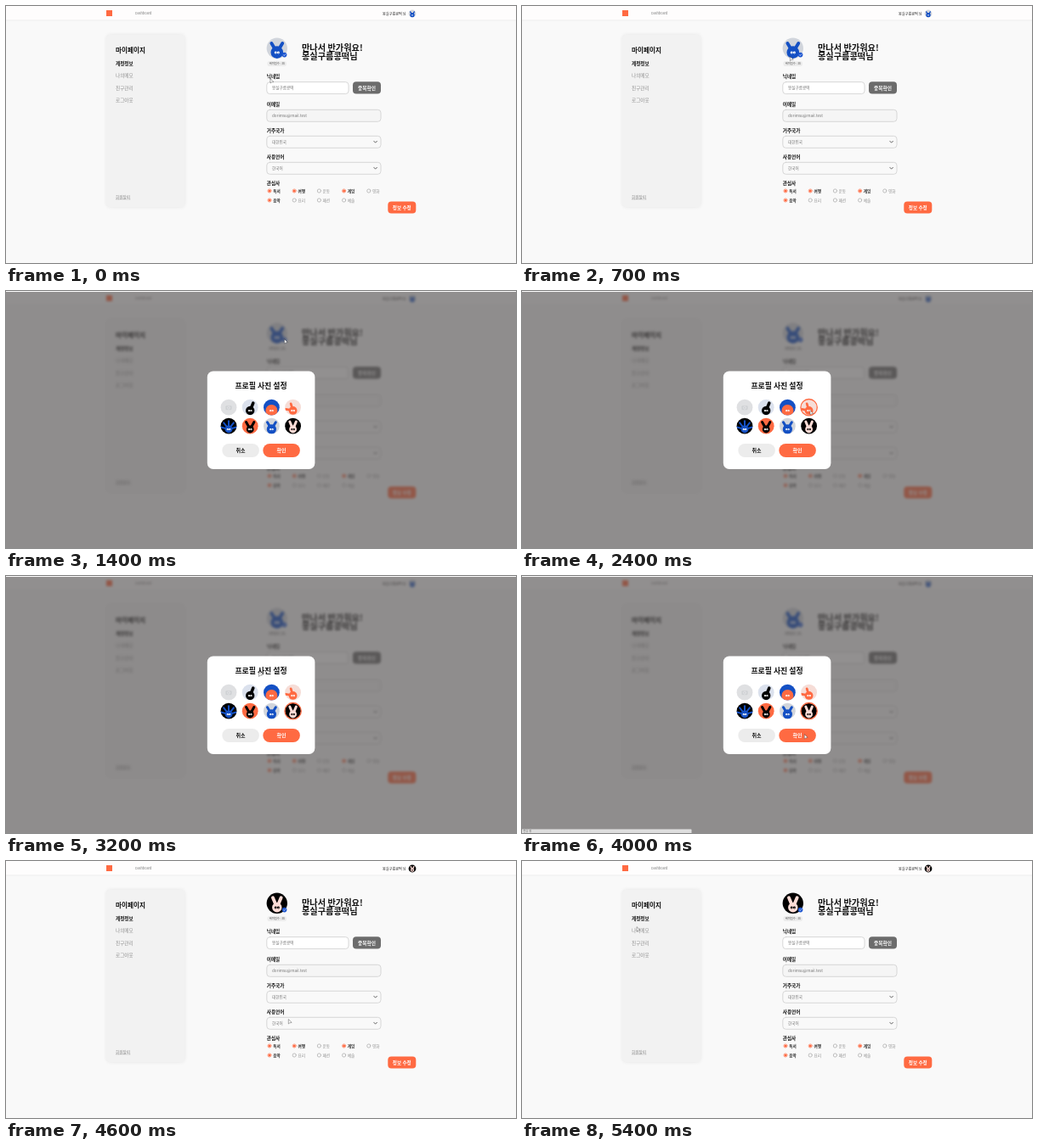
An HTML page with a canvas that plays this animation: 600x303 px, repeating every 5500 ms.

```html
<!DOCTYPE html>
<html lang="ko">
<head>
<meta charset="utf-8">
<title>마이페이지</title>
<style>
html, body { margin: 0; width: 100%; height: 100%; overflow: hidden; background: #f9f9f9; }
canvas { display: block; width: 600px; height: 303px; }
</style>
</head>
<body>
<canvas id="stage"></canvas>
<script>
const W = 600, H = 303, LOOP = 5500, STEP = 100;
const OPEN = 1400, PICK_A = 2400, PICK_B = 3100, SEND = 3900, LOAD = 4100, DONE = 4300, IDLE = 4500;
const FONT = '"Noto Sans CJK KR", "Noto Sans KR", "Noto Sans", sans-serif';
const BG = '#f9f9f9', INK = '#111', MUTED = '#8d8d8d', ORANGE = '#ff6a42', BLUE = '#1450c4', BLACK = '#000';
const NICK = '몽실구름콩떡', MAIL = 'dorimsu@mail.test';
const COL = 306.8;

const dpr = window.devicePixelRatio || 1;
const stage = document.getElementById('stage');
const layer = document.createElement('canvas');
for (const c of [stage, layer]) { c.width = W * dpr; c.height = H * dpr; }
const view = stage.getContext('2d');
const under = layer.getContext('2d');
view.scale(dpr, dpr);
under.scale(dpr, dpr);
let g = view;

function text(s, x, y, size, color = INK, weight = 400, align = 'left') {
  g.font = `${weight} ${size}px ${FONT}`;
  g.fillStyle = color;
  g.textAlign = align;
  g.textBaseline = 'alphabetic';
  g.fillText(s, x, y + size * 0.37);
}

function box(x, y, w, h, r, fill, stroke) {
  g.beginPath();
  g.roundRect(x, y, w, h, r);
  g.fillStyle = fill;
  g.fill();
  if (stroke) {
    g.strokeStyle = stroke;
    g.lineWidth = 0.8;
    g.stroke();
  }
}

function dot(x, y, r, fill) {
  g.beginPath();
  g.arc(x, y, r, 0, Math.PI * 2);
  g.fillStyle = fill;
  g.fill();
}

function ring(x, y, r, color, width) {
  g.beginPath();
  g.arc(x, y, r, 0, Math.PI * 2);
  g.strokeStyle = color;
  g.lineWidth = width;
  g.stroke();
}

function line(points, color, width) {
  g.beginPath();
  points.forEach(([x, y]) => g.lineTo(x, y));
  g.strokeStyle = color;
  g.lineWidth = width;
  g.lineCap = g.lineJoin = 'round';
  g.stroke();
}

function button(x, y, w, h, r, s, size, fill, color) {
  box(x, y, w, h, r, fill);
  text(s, x + w / 2, y + h / 2 + 0.1, size, color, 700, 'center');
}

// A palm with n fingers fanned evenly over `spread` degrees around `tilt`
function hand(x, y, { skin, n, spread = 0, tilt = 0, palm = 0.47, w = 0.32, reach = 1.02 }) {
  for (let i = 0; i < n; i++) {
    const a = (tilt + (n > 1 ? spread * (i / (n - 1) - 0.5) : 0)) * Math.PI / 180;
    line([[x, y], [x + Math.sin(a) * reach, y - Math.cos(a) * reach]], skin, w);
  }
  dot(x, y, palm, skin);
}

const HANDS = [
  null,
  { bg: '#dbe1ed', skin: BLACK, n: 1, tilt: 22, palm: 0.55, w: 0.38 },
  { bg: BLUE, skin: ORANGE, n: 0, palm: 0.75 },
  { bg: '#f6ddd7', skin: ORANGE, n: 2, spread: 62, tilt: -48, palm: 0.52, w: 0.3, reach: 0.9 },
  { bg: BLACK, skin: BLUE, n: 5, spread: 150, w: 0.22 },
  { bg: ORANGE, skin: BLACK, n: 2, spread: 58 },
  { bg: '#d1d5dc', skin: BLUE, n: 2, spread: 62, palm: 0.6 },
  { bg: BLACK, skin: '#ffdcd6', n: 2, spread: 46, eye: BLACK }
];

function avatar(id, x, y, r) {
  const h = HANDS[id];
  g.save();
  g.translate(x, y);
  g.scale(r, r);
  dot(0, 0, 1, h ? h.bg : '#dfe0e2');
  g.clip();
  if (h) {
    hand(0, 0.4, h);
    for (const side of [-1, 1]) {
      dot(side * 0.13, 0.42, 0.12, h.eye || '#fff');
      dot(side * 0.13, 0.44, 0.04, h.skin);
    }
  } else {
    box(-0.38, -0.22, 0.76, 0.55, 0.12, '#cfd1d4');
    ring(0, 0.05, 0.16, '#e5e6e8', 0.08);
  }
  g.restore();
}

function header(loading, id) {
  g.fillStyle = '#fefdfd';
  g.fillRect(0, 0, W, 17);
  g.fillStyle = '#ebebeb';
  g.fillRect(0, 16.5, W, 0.8);
  g.fillStyle = ORANGE;
  g.fillRect(118, 5, 7, 7);
  text('Dashboard', 152, 8.8, 3.8, '#777');
  if (loading) {
    text('님', 466.5, 9, 4.1, '#333', 500);
    text('프로', 473.5, 7, 3.5, '#555');
    text('필', 475.5, 11, 3.5, '#555');
  } else {
    text(NICK + ' 님', 443, 9, 4.15, '#222', 500);
    avatar(id, 478, 9, 4.4);
  }
}

function sidebar() {
  g.save();
  g.shadowColor = 'rgba(0,0,0,.07)';
  g.shadowBlur = 4 * dpr;
  box(118, 33.5, 92.5, 204, 5, '#f2f2f2');
  g.restore();
  text('마이페이지', 129, 52, 7.6, INK, 700);
  ['계정정보', '나의메모', '친구관리', '로그아웃'].forEach((s, i) =>
    text(s, 129, 67.7 + i * 14.4, 5.6, i ? MUTED : INK, i ? 400 : 700));
  text('회원탈퇴', 129, 225.2, 4.6, '#888');
  line([[129, 227.9], [146, 227.9]], '#999', 0.4);
}

function field(y, w, s, fill, select) {
  box(COL, y, w, 14, 3.6, fill, '#cfcfcf');
  text(s, 313, y + 7.1, 4.6, '#747474');
  if (select) line([[432.8, y + 6], [434.6, y + 7.9], [436.4, y + 6]], '#555', 0.9);
}

function profile(id) {
  avatar(id, 318.8, 49.8, 12.2);
  dot(327.6, 57.6, 2.8, '#1c55d0');
  line([[326.4, 57.7], [327.3, 58.6], [328.9, 56.7]], '#fff', 0.6);
  box(307.5, 65.2, 22.5, 5.8, 2, '#ececec');
  text('해피점수 : 38', 318.8, 68.1, 3.3, '#555', 500, 'center');
  text('만나서 반가워요!', 348, 49.7, 10.2, INK, 700);
  text(NICK + '님', 348, 59.2, 10.2, INK, 700);

  text('닉네임', COL, 83, 5.6, INK, 700);
  field(89.6, 96.2, NICK, '#fff');
  button(408, 89.3, 33, 14.2, 4, '중복확인', 5.7, '#6c6c6c', '#fff');
  ['이메일', '거주국가', '사용언어', '관심사'].forEach((s, i) => {
    const y = 116 + i * 31;
    text(s, COL, y, 5.6, INK, 700);
    if (i < 3) field(y + 6.3, 134.2, [MAIL, '대한민국', '한국어'][i], i ? BG : '#f5f5f5', i > 0);
  });

  const liked = '독서 여행 게임 음악';
  '독서 여행 운동 게임 영화 음악 요리 패션 예술'.split(' ').forEach((s, i) => {
    const x = 310 + (i % 5) * 29.2, y = i < 5 ? 218 : 229;
    const on = liked.includes(s);
    ring(x, y, 2.1, on ? ORANGE : '#999', 0.6);
    if (on) dot(x, y, 1.5, ORANGE);
    text(s, x + 4.2, y + 0.1, 4.6, on ? '#222' : MUTED, on ? 700 : 400);
  });
  button(449.3, 230.4, 33, 14, 4, '정보 수정', 5.6, ORANGE, '#fff');
}

function page(t) {
  const loading = t >= LOAD && t < DONE;
  const id = t < DONE ? 6 : 7;
  g.fillStyle = BG;
  g.fillRect(0, 0, W, H);
  header(loading, id);
  sidebar();
  if (loading) hand(346.8, 126.4, { skin: BLACK, n: 2, spread: 46, palm: 9.6, w: 6.2, reach: 21 });
  else profile(id);
}

function modal(t) {
  g.fillStyle = 'rgba(80,77,77,.62)';
  g.fillRect(0, 1, W, H - 1);
  box(236.8, 94.5, 126.6, 115.5, 7, '#fff');
  text('프로필 사진 설정', 300, 112, 8.9, INK, 700, 'center');
  const pick = t < PICK_A ? -1 : t < PICK_B ? 3 : 7;
  HANDS.forEach((_, i) => {
    const x = 262 + (i % 4) * 25.2, y = i < 4 ? 137.2 : 159.2;
    avatar(i, x, y, 9.4);
    if (i === pick) ring(x, y, 9.7, ORANGE, 1.3);
  });
  button(254.3, 180, 43.6, 16, 8, '취소', 6, '#ececec', INK);
  button(302.3, 180, 43.6, 16, 8, '확인', 6, ORANGE, '#fff');
}

function status() {
  box(0, 298.5, 199.5, 5, [0, 1, 0, 0], '#dedede');
  text('전송 중', 1.2, 301, 3.4, '#666');
}

// Pointer trips: begin, end, and the place reached
const TRIPS = [
  { from: 0, to: 300, at: [469, 233] },
  { from: 300, to: 600, at: [314, 60] },
  { from: 600, to: 1100, at: [327.5, 57] },
  { from: OPEN, to: 2000, at: [339, 141] },
  { from: PICK_A, to: 2900, at: [337, 174] },
  { from: PICK_B, to: 3300, at: [258, 53] },
  { from: 3300, to: 3700, at: [332.3, 187] },
  { from: 4900, to: 5000, at: [336, 213] },
  { from: 5000, to: 5400, at: [135, 78] }
];

function pointerAt(t) {
  let x = 311, y = 86;
  for (const { from, to, at } of TRIPS) {
    const k = Math.min(1, Math.max(0, (t - from) / (to - from)));
    const e = k * k * (3 - 2 * k);
    x += (at[0] - x) * e;
    y += (at[1] - y) * e;
  }
  return [x, y];
}

function pointer(t) {
  const [x, y] = pointerAt(t);
  g.beginPath();
  g.moveTo(x, y);
  g.lineTo(x, y + 5);
  g.lineTo(x + 1.4, y + 3.9);
  g.lineTo(x + 3.5, y + 3.5);
  g.closePath();
  g.fillStyle = '#fff';
  g.fill();
  g.strokeStyle = '#444';
  g.lineWidth = 0.45;
  g.stroke();
}

function draw(now) {
  const t = Math.floor((now % LOOP) / STEP) * STEP;
  if (t >= OPEN && t < LOAD) {
    g = under;
    page(t);
    g = view;
    g.fillStyle = BG;
    g.fillRect(0, 0, W, H);
    g.filter = `blur(${1.6 * dpr}px)`;
    g.drawImage(layer, 0, 0, W, H);
    g.filter = 'none';
    modal(t);
  } else {
    page(t);
  }
  if (t >= SEND && t < IDLE) status();
  pointer(t);
}

let start;
function tick(now) {
  start ??= now;
  draw(now - start);
  requestAnimationFrame(tick);
}
draw(0);
requestAnimationFrame(tick);
</script>
</body>
</html>
```
